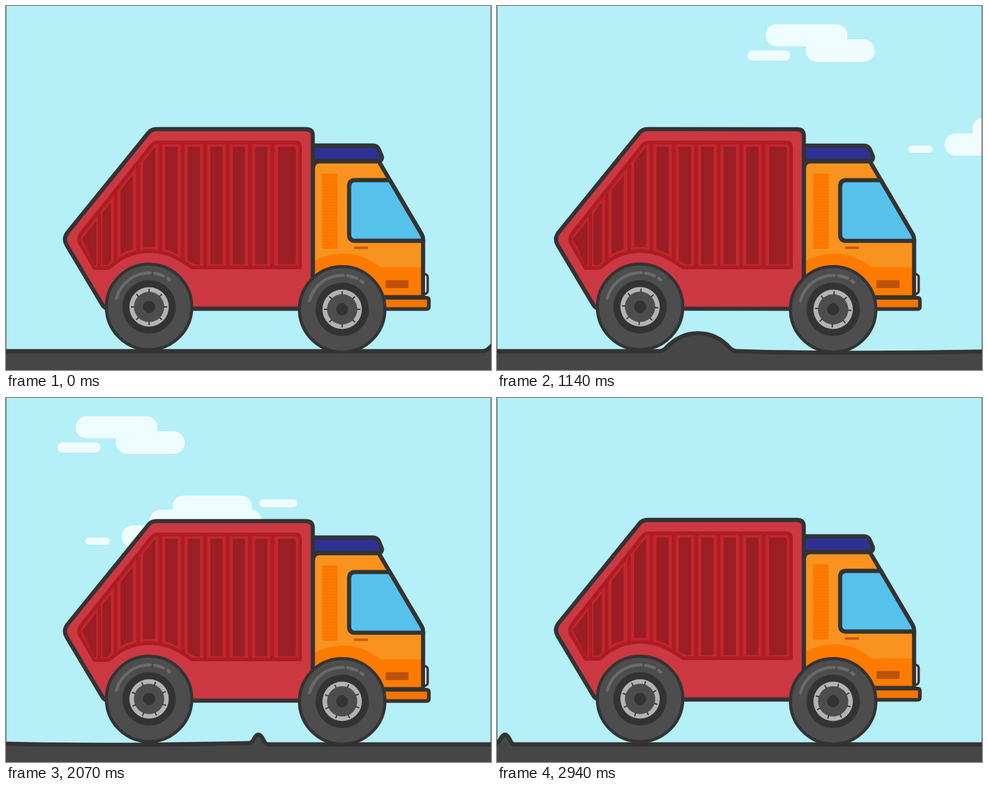
Animation, 800 px wide and 600 px high, one loop 2970 ms. Source, as an HTML page:

```html
<!DOCTYPE html>
<html lang="en">
<head>
<meta charset="utf-8">
<title>Truck on a bumpy road</title>
<style>
html, body { margin: 0; width: 100%; height: 100%; overflow: hidden; background: #b5eff7; }
svg { display: block; width: 800px; height: 600px; }
.line { stroke: #333; stroke-width: 6.8; stroke-linejoin: round; }
</style>
</head>
<body>
<svg viewBox="0 0 800 600">
  <defs>
    <clipPath id="panel">
      <path d="M125 384L149 354L246 232H474Q478 232 478 236V426H312L300 420Q268 397 236 397Q195 397 168 427H146Z"/>
    </clipPath>
    <path id="cab" d="M506 480V268Q507 256 517 256H615L686 377Q688 381 688 388V480Z"/>
    <g id="tyre">
      <circle r="70.5" fill="#4d4d4d" stroke="#333" stroke-width="5"/>
      <circle r="44" fill="#333"/>
      <circle r="32.5" fill="#b3b3b3"/>
      <circle r="25" fill="#4d4d4d"/>
      <circle r="10" fill="#333"/>
      <path fill="none" stroke="#6a6a6a" stroke-width="5" stroke-linecap="round" d="M-54 -14A56 56 0 0 1 2 -56M9 -55.5A56 56 0 0 1 24 -51M31 -47L34 -44.5"/>
    </g>
  </defs>
  <rect width="800" height="600" fill="#b5eff7"/>
  <g id="highCloud" fill="#effcfe"></g>
  <g id="lowCloud" fill="#effcfe"></g>
  <path d="M.5 0V570M799.5 0V570" stroke="#333" stroke-opacity=".6"/>
  <path id="road" class="line" fill="#464646" d="M-900 569H-2Q4 569 9 564Q32 539.5 62 539.5Q93 539.5 115 564Q120 569 127 569C250 573 400 572 562 569Q567 569 570 563Q574 555 578 555Q582 555 586 563Q589 571 594 571H2000V700H-900Z"/>
  <g id="body">
    <rect x="680" y="442" width="15.5" height="32.5" rx="5" fill="#fff" stroke="#333" stroke-width="4"/>
    <use href="#cab" fill="#f7931e"/>
    <path fill="#ff7b00" d="M506 422Q530 408 556 408Q590 408 618 431H688V480H506Z"/>
    <rect x="521" y="276" width="26" height="124" rx="2" fill="#ff7b00"/>
    <g id="grille" stroke="#f67300" stroke-width="1.5"></g>
    <rect x="574" y="396.500" width="23" height="4" rx="1" fill="#c9560c"/>
    <rect x="626" y="452" width="38" height="13" rx="1" fill="#bd520a"/>
    <use href="#cab" class="line" fill="none"/>
    <path class="line" fill="#56c1eb" d="M576 287H633L686 377Q688 381 688 387H576Q566 387 566 377V297Q566 287 576 287Z"/>
    <path class="line" fill="#2e3192" d="M500 230H605Q612 230 615 236L620 248Q621 255.500 614 255.500H500Z"/>
    <rect class="line" style="stroke-width:6" x="560" y="481" width="137.500" height="18.500" rx="3" fill="#f47500"/>
    <path class="line" fill="#cc3842" d="M248 203H495Q506 203 506 214V499H170Q162 499 158 491L100 394Q94 384 101 374L235 209Q240 203 248 203Z"/>
    <path fill="#c1272d" stroke="#ad1c25" stroke-width="6" stroke-linejoin="round" d="M250 225H477Q485 225 485 233V431H307L298 425Q268 404 236 404Q200 404 171 431L166 432H146L123 393Q118 385 123 376L240 230Q244 225 250 225Z"/>
    <g id="slats"></g>
  </g>
  <g id="rear"></g>
  <g id="front"></g>
</svg>
<script>
const $ = id => document.getElementById(id);
const LOOP = 2970, STEP = 30;
const REAR = { x: 236, y: 496 }, FRONT = { x: 554.5, y: 500 };

const pills = list => list.map(([x, y, right, bottom]) =>
  `<rect x="${x}" y="${y}" width="${right - x}" height="${bottom - y}" rx="${(bottom - y) / 2}"/>`).join('');

$('highCloud').innerHTML = pills([[602, 30, 737, 66.5], [668, 55, 782, 92], [572, 73, 643, 90]]);
$('lowCloud').innerHTML = pills([
  [116, 161, 247, 197], [78, 184, 263, 221], [32, 210, 235, 246.5], [96, 230, 337, 266.5],
  [259, 167, 322, 180], [319, 202, 352, 211], [-28, 230, 12.5, 242]
]) + '<rect x="96" y="200" width="121" height="48"/>';

let lines = '';
for (let y = 279; y < 400; y += 5) lines += `<path d="M523 ${y}H546"/>`;
$('grille').innerHTML = lines;

// Dividers follow the slanted top and the wheel arch.
const dividers = [[154, 340, 430], [181, 307, 421], [218, 261, 404], [254.5, 228, 404]];
for (let x = 291.5; x < 445; x += 37) dividers.push([x, 228, x < 300 ? 419 : 430]);
const cells = [[120, 29], [159, 14], [189, 20]];
for (let x = 226; x < 440; x += 37) cells.push([x, 20]);
cells.push([449, 29]);
$('slats').innerHTML =
  dividers.map(([x, top, end]) => `<path d="M${x} ${top}V${end}" stroke="#ad1c25" stroke-width="6"/>`).join('') +
  '<g clip-path="url(#panel)" fill="#9a1e23">' +
  cells.map(([x, w]) => `<rect x="${x}" y="225" width="${w}" height="210"/>`).join('') + '</g>';

let ticks = '';
for (let a = 0; a < 360; a += 45) ticks += `<path d="M0 -24V-30" transform="rotate(${a})"/>`;
for (const id of ['rear', 'front'])
  $(id).innerHTML = `<use href="#tyre"/><g class="ticks" stroke="#333" stroke-width="2">${ticks}</g>`;

const move = (id, x, y = 0) => $(id).setAttribute('transform', `translate(${x} ${y})`);
const hump = (d, reach, height) =>
  Math.abs(d) < reach ? height * Math.cos(Math.PI * d / reach / 2) ** 2 : 0;
const lift = (wheel, road) =>
  Math.max(hump(wheel.x - road - 62, 100, 29.5), hump(wheel.x - road - 578, 60, 15));

function draw(t) {
  const road = t < 690 ? 788 - t * 310 / 690 : 478 - (t - 690) * 0.4635;
  const rear = lift(REAR, road), front = lift(FRONT, road);
  const tilt = (rear - front) * 0.122;
  // The body rises slightly once the big bump is behind it.
  const rise = 2 * Math.max(0, (t - 1830) / 1110) ** 2;

  move('highCloud', (690 - t) * 0.353);
  move('lowCloud', (2340 - t) * 0.5885);
  move('road', road);
  move('rear', REAR.x, REAR.y - rear);
  move('front', FRONT.x, FRONT.y - front);
  $('body').setAttribute('transform', `translate(0 ${-rise}) rotate(${tilt} 400 507)`);
  for (const g of document.querySelectorAll('.ticks'))
    g.setAttribute('transform', `rotate(${t * 0.358})`);
}

const start = performance.now();
function frame() {
  const t = (performance.now() - start) % LOOP;
  draw(Math.floor(t / STEP) * STEP);
  requestAnimationFrame(frame);
}
frame();
</script>
</body>
</html>
```
